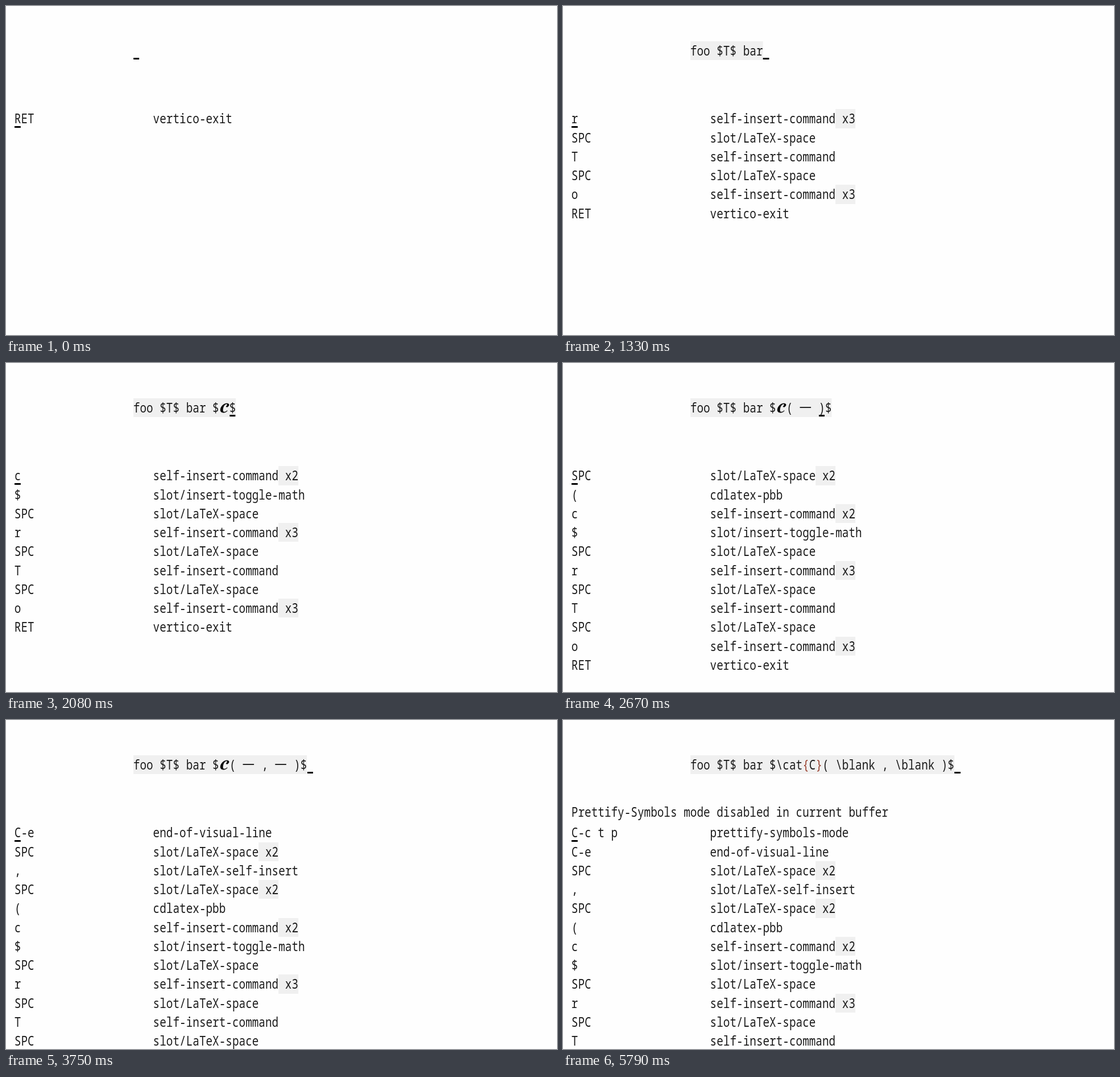
Write an HTML page that moves like this. It is 969 px wide and 578 px high and loops after 7 s.

```html
<!DOCTYPE html>
<html lang="en">
<head>
<meta charset="utf-8">
<title>Typing log</title>
<style>
html, body { margin: 0; width: 100%; height: 100%; overflow: hidden; background: #fefefe; }
/* narrow monospace cell: half an em wide */
#stage {
  position: absolute; left: 0; top: 0; width: 120%; height: 100%; overflow: hidden;
  transform: scaleX(.83333); transform-origin: 0 0;
  font: 500 23.22px/33.27px "Noto Sans Mono", "DejaVu Sans Mono", monospace;
  font-variant-ligatures: none; color: #1c1c1c; white-space: pre;
}
#edit, #note, #log { position: absolute; left: 17.8px; height: 33.27px; }
#edit { top: 61.6px; margin-left: 18ch; display: flex; }
#note { top: 145px; }
#log { top: 181.3px; }
.row { position: relative; height: 33.27px; }
.cmd { position: absolute; left: 21ch; top: 0; display: flex; }
.shade { background: #f0f0f0; height: 33.27px; }
.cell { display: inline-block; position: relative; height: 33.27px; vertical-align: top; }
.cur { min-width: 1ch; }
.cur::after { content: ""; position: absolute; left: .4px; bottom: .8px; width: .9ch; height: 3px; background: #000; }
.dash { width: 1.88ch; }
.dash i {
  position: absolute; left: -.5px; top: -1.4px;
  font: normal 26px/33.27px "DejaVu Sans", sans-serif;
}
.script { width: 1.56ch; }
.script svg { position: absolute; left: 1px; top: 8.6px; width: 21.6px; height: 18px; overflow: visible; }
b { font-weight: inherit; color: #9c4432; }
</style>
</head>
<body>
<div id="stage">
  <div id="edit"></div>
  <div id="note"></div>
  <div id="log"></div>
</div>
<script>
const LOOP = 7000;
const SELF = "self-insert-command", SPACE = "slot/LaTeX-space";
const MATH = "foo $T$ bar $";

// time, key, command, text with | for the cursor, * for the script letter, _ for a blank slot
const keys = [
  [0, "RET", "vertico-exit", "|"],
  [170, "f", SELF, "f|"],
  [260, "o", SELF, "fo|"],
  [350, "o", SELF, "foo|"],
  [470, "SPC", SPACE, "foo |"],
  [610, "T", SELF, "foo T|"],
  [750, "SPC", SPACE, "foo $T$ |"],
  [930, "b", SELF, "foo $T$ b|"],
  [1060, "a", SELF, "foo $T$ ba|"],
  [1180, "r", SELF, "foo $T$ bar|"],
  [1400, "SPC", SPACE, "foo $T$ bar |"],
  [1530, "$", "slot/insert-toggle-math", MATH + "|$"],
  [1760, "c", SELF, MATH + "c|$"],
  [1900, "c", SELF, MATH + "*|$"],
  [2240, "(", "cdlatex-pbb", MATH + "*(|)$"],
  [2410, "SPC", SPACE, MATH + "*( |)$"],
  [2550, "SPC", SPACE, MATH + "*( _ |)$"],
  [2790, ",", "slot/LaTeX-self-insert", MATH + "*( _ ,|)$"],
  [2910, "SPC", SPACE, MATH + "*( _ , |)$"],
  [3030, "SPC", SPACE, MATH + "*( _ , _ |)$"],
  [3550, "C-e", "end-of-visual-line", MATH + "*( _ , _ )$|"],
  [4150, "C-c t p", "prettify-symbols-mode", MATH + "\\cat{C}( \\blank , \\blank )$|"]
];

const $ = id => document.getElementById(id);
const cursor = ch => `<span class="cell cur">${ch}</span>`;
const scriptC = '<span class="cell script"><svg viewBox="0 0 18 19" preserveAspectRatio="none">' +
  '<path stroke="#000" stroke-width=".5" d="M13.5 14.8C10.5 19.2 1 20 1.2 13C1.4 7 7 1 12.5 1' +
  'C17 1 17.4 4.5 14.5 7C13 8.2 11.2 8 11.4 6.6C11.6 5.5 13.4 5.4 13.3 3.2C13.2 1.4 10.5 1.8 8.5 4.2' +
  'C5.5 7.8 3.9 17 8 17C10 17 12 15.8 12.9 14.3Z"/></svg></span>';

function styled(text) {
  return text.replace(/[*_{}]/g, c =>
    c === "*" ? scriptC :
    c === "_" ? '<span class="cell dash"><i>—</i></span>' : `<b>${c}</b>`);
}

function editLine(text) {
  const [before, after] = text.split("|");
  const inside = after ? cursor(after[0]) + styled(after.slice(1)) : "";
  return `<div class="shade">${styled(before)}${inside}</div>${after ? "" : cursor("")}`;
}

// Repeats of one command share a row that shows the latest key.
function logRows(count) {
  const rows = [];
  for (const [, key, cmd] of keys.slice(0, count)) {
    if (rows.length && rows[0].cmd === cmd) {
      rows[0].key = key;
      rows[0].n++;
    } else rows.unshift({ key, cmd, n: 1 });
  }
  return rows.map(({ key, cmd, n }, i) => {
    const label = i ? key : cursor(key[0]) + key.slice(1);
    const badge = n > 1 ? `<span class="shade"> x${n}</span>` : "";
    return `<div class="row">${label}<div class="cmd"><span>${cmd}</span>${badge}</div></div>`;
  }).join("");
}

let shown = 0;
function draw() {
  const t = performance.now() % LOOP;
  const count = keys.filter(k => k[0] <= t).length;
  if (count !== shown) {
    shown = count;
    $("edit").innerHTML = editLine(keys[count - 1][3]);
    $("log").innerHTML = logRows(count);
    $("note").textContent = count === keys.length
      ? "Prettify-Symbols mode disabled in current buffer" : "";
  }
  requestAnimationFrame(draw);
}
draw();
</script>
</body>
</html>
```
